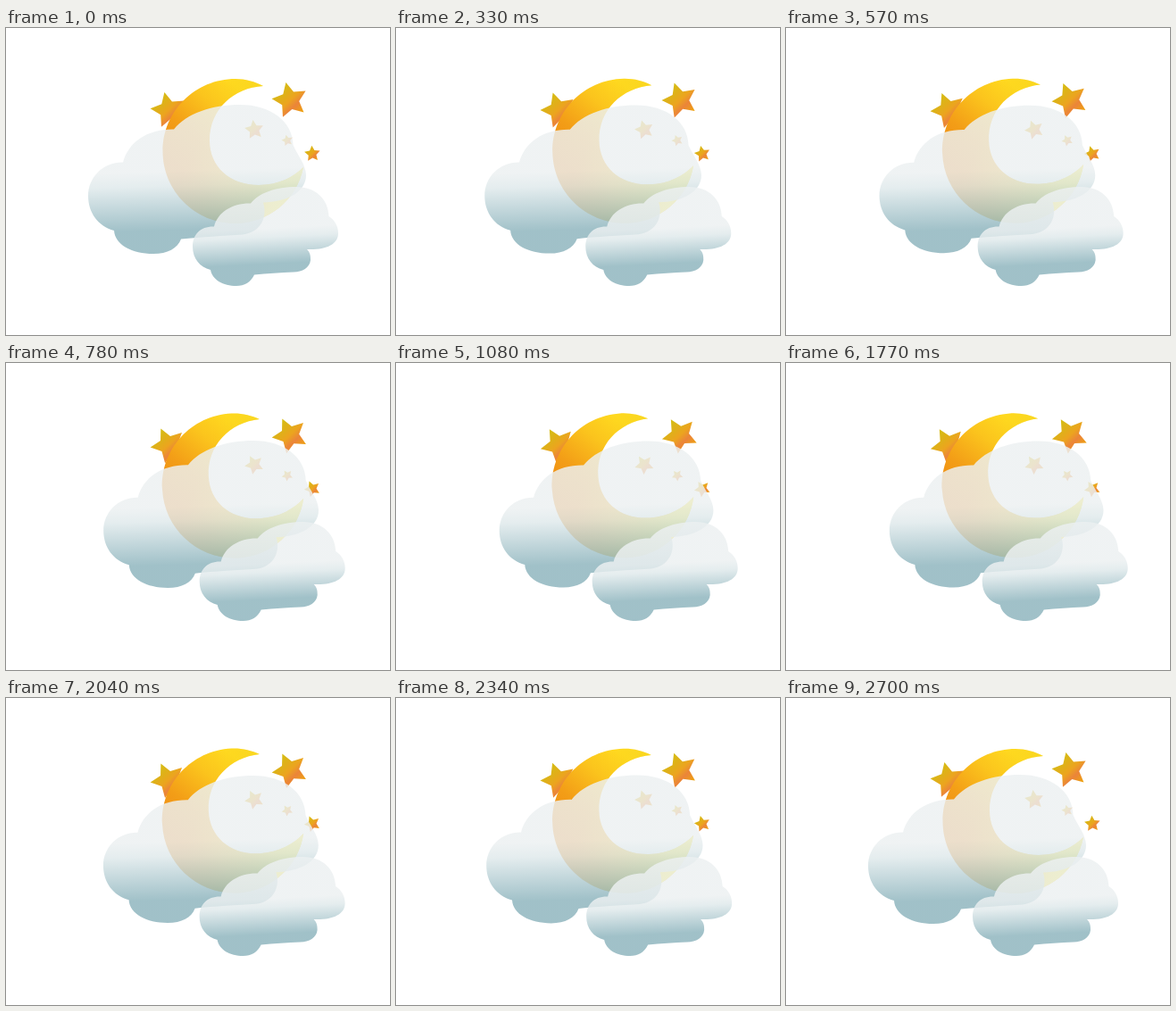
An HTML page with a canvas that plays this animation: 430x344 px, repeating every 2.73 s.

```html
<!DOCTYPE html>
<html lang="en">
<head>
<meta charset="utf-8">
<title>Night clouds</title>
<style>
  html, body { margin: 0; width: 100%; height: 100%; overflow: hidden; background: #fff; }
  canvas { display: block; width: 430px; height: 344px; }
</style>
</head>
<body>
<canvas id="stage" width="430" height="344"></canvas>
<script>
const ctx = document.getElementById('stage').getContext('2d');
const LOOP = 2730, TURN = 1455, END = 2700;
const CLOUD_ALPHA = 0.83;

const moon = new Path2D(`M288 65 C255 67 228 91 228 126 C228 155 250 176 283 176
  C305 176 322 167 333 156 C326 193 293 219 257 219 C212 219 175.5 183 175.5 138
  C175.5 93 212 57 257 57 C268 57 279 60 288 65Z`);

const backCloud = new Path2D(`M92 188 C92 167 109 150 131 150.5 C137 128 158 113 188 113.5
  C202 96 230 86 262 86 C297 86 321 105 321.5 131 C326 142 336 153 336 165
  C336 184 314 195 288 195.5 C293 211 286 229 265 231.5 C245 233 218 234 196 236.5
  C192 247 181 253 165 253 C141 253 122 243 121 227 C103 222 92 207 92 188Z`);

const frontCloud = new Path2D(`M209 245 C209 231 218 222 233 222.5 C237 206 254 196 274 196.5
  C283 185 302 178 325 178 C347 178 361 192 361.5 211
  C368 215 372 222 372 230 C372 243 357 249 337 248 C341 252 341 256 341 260
  C340 269 332 273 322 273.5 C308 274 292 275 278 276.5 C274 285 267 289 258 289
  C243 289 231 282 229 271 C217 268 209 258 209 245Z`);

// x, y, radius, starting angle and spin in degrees
const stars = [
  [182, 92, 20.5, -13, -22.5],
  [318, 81, 20.5, -13, -22.5],
  [278, 114, 11, -8, -34],
  [315, 126, 6.5, -13, -34],
  [343, 141, 9.2, -4, -34]
];

function gradient(x0, y0, x1, y1, stops) {
  const fill = ctx.createLinearGradient(x0, y0, x1, y1);
  stops.forEach(([at, color]) => fill.addColorStop(at, color));
  return fill;
}

const moonFill = gradient(185, 150, 262, 64, [
  [0, '#ee8a14'], [0.33, '#f39e17'], [0.68, '#fbc41d'], [0.97, '#ffd91f']
]);
const moonGlow = gradient(200, 160, 300, 205, [
  [0, 'rgba(240,205,30,0)'], [1, 'rgba(240,225,45,1)']
]);
const starFill = gradient(-0.7, -0.75, 0.65, 0.7, [
  [0, '#d3c013'], [0.3, '#dfb019'], [0.52, '#eca41f'], [0.72, '#eb843a'], [1, '#eea30c']
]);
const cloudFill = (top, bottom) => gradient(200, top, 202, bottom, [
  [0, '#ecf0f1'], [0.25, '#dfe9eb'], [1, '#8db4bd']
]);
const backFill = cloudFill(160, 226);
const frontFill = cloudFill(229, 269);

const radians = degrees => degrees * Math.PI / 180;

function drawStar(x, y, radius, degrees) {
  ctx.save();
  ctx.translate(x, y);
  ctx.scale(radius, radius);
  ctx.beginPath();
  for (let i = 0; i < 10; i++) {
    const r = i % 2 ? 0.5 : 1;
    const a = radians(degrees + i * 36);
    ctx.lineTo(r * Math.sin(a), -r * Math.cos(a));
  }
  ctx.closePath();
  ctx.fillStyle = starFill;
  ctx.fill();
  ctx.restore();
}

function drawMoon(degrees) {
  ctx.save();
  ctx.translate(246, 150);
  ctx.rotate(radians(degrees));
  ctx.translate(-246, -150);
  for (const fill of [moonFill, moonGlow]) {
    ctx.fillStyle = fill;
    ctx.fill(moon);
  }
  ctx.restore();
}

function drawCloud(path, fill, dx, scale) {
  ctx.save();
  ctx.globalAlpha = CLOUD_ALPHA;
  ctx.translate(92 + dx, 169);
  ctx.scale(scale, scale);
  ctx.translate(-92, -169);
  ctx.fillStyle = fill;
  ctx.fill(path);
  ctx.restore();
}

function draw(time) {
  const t = time % LOOP;
  const sway = t < TURN ? t / TURN : Math.max(0, (END - t) / (END - TURN));
  ctx.fillStyle = '#fff';
  ctx.fillRect(0, 0, 430, 344);
  stars.forEach(([x, y, radius, angle, spin]) => drawStar(x, y, radius, angle + spin * sway));
  drawMoon(-5.2 * sway);
  drawCloud(backCloud, backFill, 32 * sway, 1 - 0.024 * sway);
  drawCloud(frontCloud, frontFill, 14.4 * sway, 1);
}

const start = performance.now();
function tick() {
  draw(performance.now() - start);
  requestAnimationFrame(tick);
}
tick();
</script>
</body>
</html>
```
